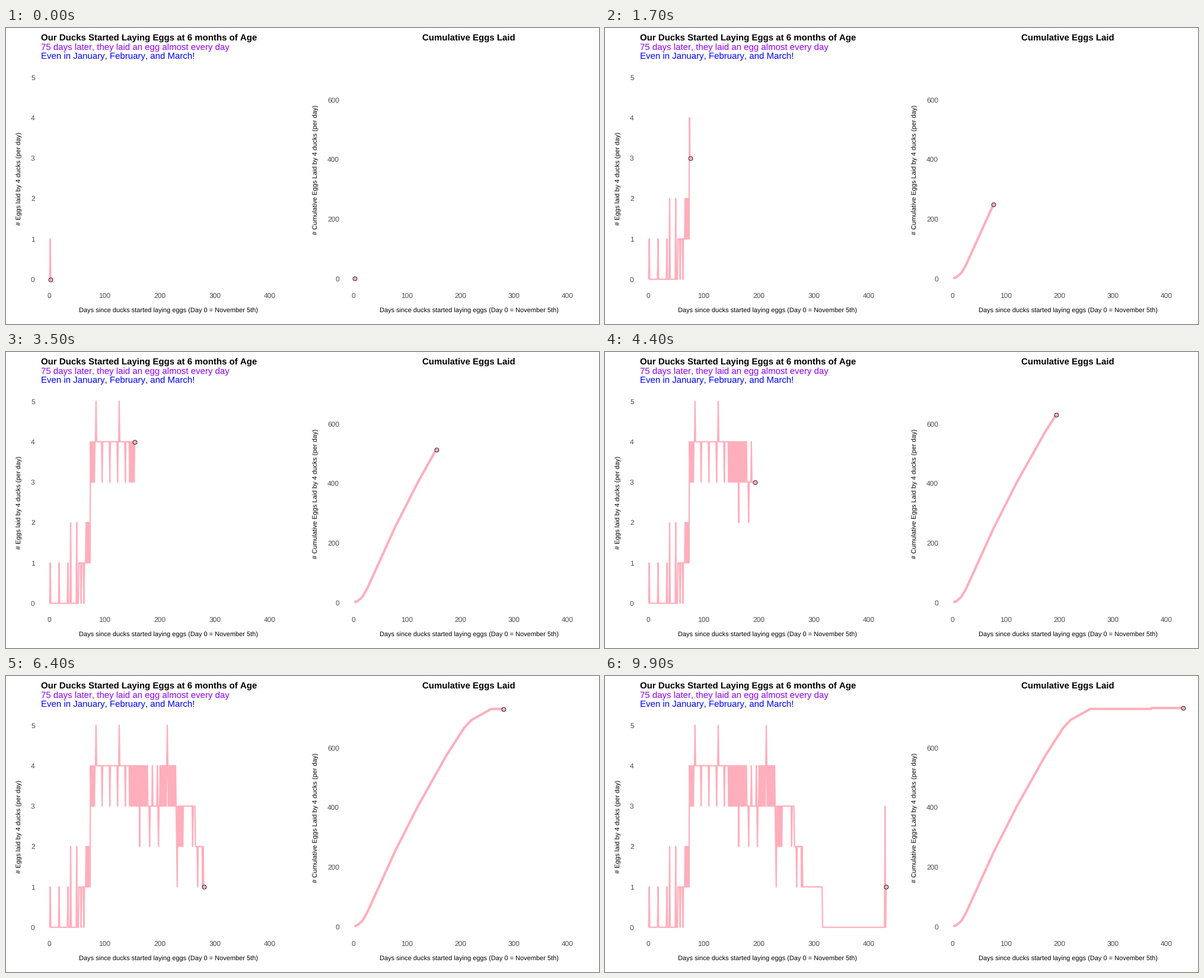
These frames come from a looping animation (1000x500 px, 10000 ms). A matplotlib script:

```python
import numpy as np
import matplotlib.pyplot as plt
from matplotlib.animation import FuncAnimation

plt.rcParams["font.family"] = "Liberation Sans"
plt.rcParams["text.hinting"] = "none"
plt.rcParams["text.kerning_factor"] = 6  # plain advances, no pair kerning

W, H, DPI = 1000, 500, 100
PX = 72 / DPI  # points per pixel
FRAMES, STEP = 100, 100
LAST = 431
PINK, PURPLE, GREY = "#FFAEBB", "#9000F0", "#4D4D4D"

# Laying phases: first day, usual eggs, other eggs, days between the others
PHASES = [(2, 0, 1, 16), (53, 1, 0, 5), (66, 2, 1, 2), (75, 3, 4, 3),
          (82, 4, 3, 14), (145, 3, 4, 2), (178, 3, 4, 9), (201, 3, 4, 2),
          (231, 3, 2, 3), (242, 3, 2, 18), (265, 2, 2, 1), (280, 1, 1, 1),
          (316, 0, 0, 1)]
# Single days that stand out
PEAKS = {39: 2, 50: 2, 85: 5, 127: 5, 164: 2, 182: 2, 198: 2, 214: 5,
         232: 1, 269: 1, 278: 1, 429: 3, 431: 1}
# Bends of the running total: day, eggs
BENDS = [(2, 0), (8, 4), (17, 18), (26, 46), (77, 248), (120, 401),
         (173, 571), (207, 666), (221, 693), (258, 730), (371, 730),
         (372, 733)]


def daily_eggs():
    eggs = np.zeros(LAST + 1)
    for start, usual, other, gap in PHASES:
        eggs[start:] = usual
        eggs[start::gap] = other
    for day, value in PEAKS.items():
        eggs[day] = value
    return eggs


def left_x(day):
    return 72.7 + 0.9313 * day


def left_y(eggs):
    return 424.5 - 68.25 * eggs


def right_x(day):
    return 585.5 + 0.9034 * day


def right_y(eggs):
    return 422.9 - 0.5032 * eggs


def current_day(i):
    return min(LAST, round(3 + 4.345 * i))


fig = plt.figure(figsize=(W / DPI, H / DPI), dpi=DPI, facecolor="white")
ax = fig.add_axes([0, 0, 1, 1])
ax.set_xlim(0, W)
ax.set_ylim(H, 0)
ax.axis("off")


def label(x, y, text, px, color="black", ha="center", **kw):
    ax.text(x, y, text, fontsize=px * PX, color=color, ha=ha,
            va="baseline", rotation_mode="anchor", **kw)


def axis_texts(to_x, to_y, y_ticks, edge, mid_x, title_x, title_y, y_title):
    for day in range(0, 401, 100):
        label(to_x(day), 456.2, str(day), 12, GREY)
    for eggs in y_ticks:
        label(edge, to_y(eggs) + 4.5, str(eggs), 12, GREY, ha="right")
    label(mid_x, 481.2,
          "Days since ducks started laying eggs (Day 0 = November 5th)", 11)
    label(title_x, title_y, y_title, 11, rotation=90)


def curve(width):
    line, = ax.plot([], [], color=PINK, lw=width * PX, snap=False,
                    solid_capstyle="butt", solid_joinstyle="round")
    dot, = ax.plot([], [], "o", ms=7 * PX, mfc=PINK, mec="black",
                   mew=0.8 * PX, snap=False, zorder=3)
    return line, dot


label(59, 22.1, "Our Ducks Started Laying Eggs at 6 months of Age", 15,
      ha="left", weight="bold")
label(59, 37.1, "75 days later, they laid an egg almost every day", 15,
      PURPLE, ha="left")
label(59, 52.1, "Even in January, February, and March!", 15, "blue",
      ha="left")
label(780.7, 22.1, "Cumulative Eggs Laid", 15, weight="bold")
axis_texts(left_x, left_y, range(6), 48.7, 274.2, 25.5, 254,
           "# Eggs laid by 4 ducks (per day)")
axis_texts(right_x, right_y, range(0, 601, 200), 562, 781, 525.5, 239.5,
           "# Cumulative Eggs Laid by 4 ducks (per day)")

days = np.arange(LAST + 1)
daily = daily_eggs()
total = np.interp(days, *zip(*BENDS))
left = curve(2.2)
right = curve(4)


def reveal(pair, xs, ys):
    line, dot = pair
    line.set_data(xs, ys)
    dot.set_data(xs[-1:], ys[-1:])


def update(i):
    end = current_day(i) + 1
    reveal(left, left_x(days[1:end]), left_y(daily[1:end]))
    reveal(right, right_x(days[2:end]), right_y(total[2:end]))
    return [*left, *right]


anim = FuncAnimation(fig, update, frames=FRAMES, interval=STEP, repeat=True,
                     repeat_delay=0, init_func=lambda: update(0))
plt.show()
```
